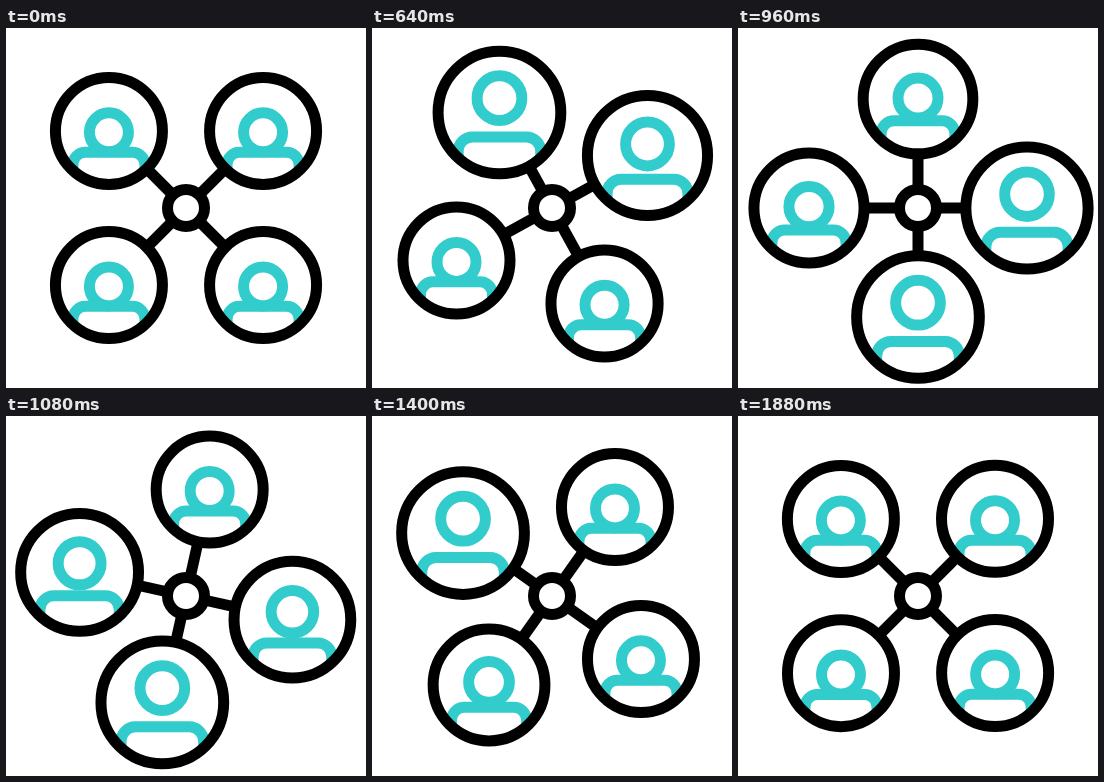
An HTML page with a canvas for the animation above (1920 ms loop, 360 by 360 pixels).

```html
<!DOCTYPE html>
<html lang="en">
<head>
<meta charset="utf-8">
<title>Rotating network</title>
<style>
  html, body { margin: 0; width: 100%; height: 100%; overflow: hidden; background: #fff; }
  canvas { display: block; width: 360px; height: 360px; }
</style>
</head>
<body>
<canvas id="stage"></canvas>
<script>
const SIZE = 360, MID = 180, LOOP = 1920, STEP = 40;
const REACH = 109, LINE = 11, RADIUS = 53.5, GROW = 0.147, HOP = 13.9, DELAY = 240;
const BLACK = '#000', TEAL = '#32cccd';

const canvas = document.getElementById('stage');
const ctx = canvas.getContext('2d');
const ratio = window.devicePixelRatio || 1;
canvas.width = canvas.height = SIZE * ratio;

// Symmetric cubic-bezier(a, 0, 1 - a, 1), solved by bisection
function ease(x, a = 0.565) {
  let lo = 0, hi = 1, u = 0.5;
  for (let i = 0; i < 30; i++) {
    u = (lo + hi) / 2;
    const v = 1 - u;
    if (3 * a * u * v * v + 3 * (1 - a) * u * u * v + u * u * u < x) lo = u;
    else hi = u;
  }
  return u * u * (3 - 2 * u);
}

function smooth(from, to, t) {
  const k = Math.min(1, Math.max(0, (t - from) / (to - from)));
  return k * k * (3 - 2 * k);
}

const pulse = t => smooth(140, 490, t) - smooth(680, 1060, t);

function ring(x, y, r, color, fill) {
  ctx.beginPath();
  ctx.arc(x, y, r, 0, Math.PI * 2);
  if (fill) {
    ctx.fillStyle = fill;
    ctx.fill();
  }
  ctx.strokeStyle = color;
  ctx.stroke();
}

function shoulders(s) {
  const x = 36 * s, top = 21.3 * s, low = 42 * s, r = 12.5 * s;
  ctx.beginPath();
  ctx.moveTo(-x, low);
  ctx.arcTo(-x, top, 0, top, r);
  ctx.arcTo(x, top, x, low, r);
  ctx.lineTo(x, low);
  ctx.strokeStyle = TEAL;
  ctx.stroke();
}

// Shapes grow with the pulse, line weight stays
function person(x, y, p) {
  const s = 1 + GROW * p;
  ctx.save();
  ctx.translate(x, y);
  ctx.save();
  ctx.beginPath();
  ctx.arc(0, 0, RADIUS * s, 0, Math.PI * 2);
  ctx.fillStyle = '#fff';
  ctx.fill();
  ctx.clip();
  shoulders(s);
  ring(0, (1.4 - HOP * p) * s, 19.5 * s, TEAL);
  ctx.restore();
  ring(0, 0, RADIUS * s, BLACK);
  ctx.restore();
}

function draw(t) {
  ctx.setTransform(ratio, 0, 0, ratio, 0, 0);
  ctx.fillStyle = '#fff';
  ctx.fillRect(0, 0, SIZE, SIZE);
  ctx.lineWidth = LINE;

  const turn = ease(t / LOOP) * Math.PI / 2;
  // Clockwise from the top left
  for (let i = 0; i < 4; i++) {
    const angle = turn + (i * 2 - 3) * Math.PI / 4;
    const x = MID + REACH * Math.cos(angle);
    const y = MID + REACH * Math.sin(angle);
    ctx.beginPath();
    ctx.moveTo(MID, MID);
    ctx.lineTo(x, y);
    ctx.strokeStyle = BLACK;
    ctx.stroke();
    person(x, y, pulse(t - i * DELAY));
  }
  ring(MID, MID, 18.5, BLACK, '#fff');
}

const start = performance.now();
function tick() {
  const t = (performance.now() - start) % LOOP;
  draw(Math.floor(t / STEP) * STEP);
  requestAnimationFrame(tick);
}
tick();
</script>
</body>
</html>
```
